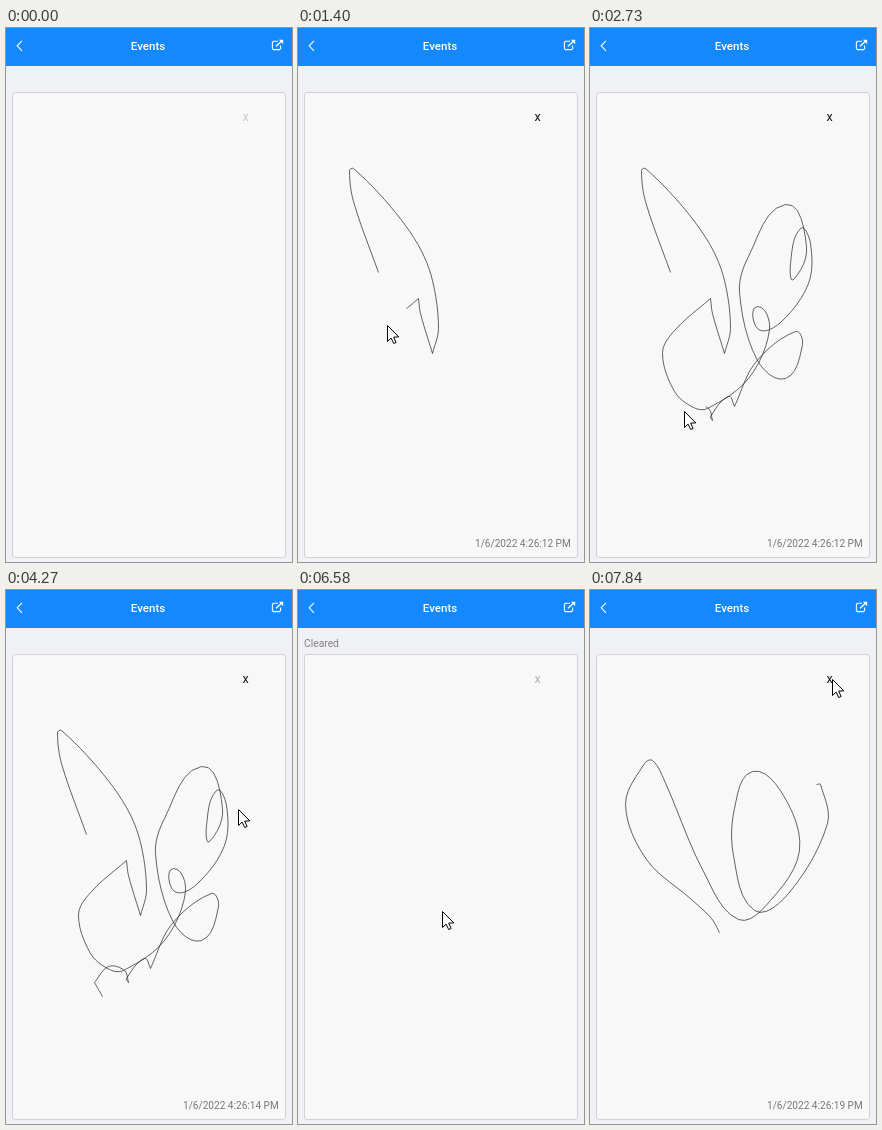
These frames come from a looping animation (286 px wide and 534 px high, 8000 ms). An HTML page with a canvas:

```html
<!DOCTYPE html>
<html lang="en">
<head>
<meta charset="utf-8">
<title>Signature pad</title>
<style>
  html, body { margin: 0; width: 100%; height: 100%; overflow: hidden; background: #f0f1f5; }
  canvas { display: block; width: 286px; height: 534px; }
</style>
</head>
<body>
<canvas id="stage" width="286" height="534"></canvas>
<script>
const ctx = document.getElementById('stage').getContext('2d');
const LOOP = 8000, STEP = 70, LAST = 7840;
const CLEAR = 6160;
const INK_LAG = 25; // px the ink trails behind the pointer

const mix = (a, b, k) => a.map((v, i) => v + (b[i] - v) * k);
const dist = (a, b) => Math.hypot(b[0] - a[0], b[1] - a[1]);

// Smooth polyline through key points; handles are a third of each span
function curve(pts) {
  const heading = i => {
    const a = pts[Math.max(i - 1, 0)], b = pts[Math.min(i + 1, pts.length - 1)], d = dist(a, b);
    return [(b[0] - a[0]) / d, (b[1] - a[1]) / d];
  };
  const out = [pts[0]];
  for (let i = 1; i < pts.length; i++) {
    const a = pts[i - 1], b = pts[i], h = dist(a, b) / 3;
    const u = heading(i - 1), v = heading(i);
    for (let k = 1 / 6; k < 1.01; k += 1 / 6) {
      const q = 1 - k;
      out.push([0, 1].map(j =>
        q * q * q * a[j] + 3 * q * q * k * (a[j] + u[j] * h) +
        3 * q * k * k * (b[j] - v[j] * h) + k * k * k * b[j]));
    }
  }
  return out;
}

// A pen stroke: arcs meet at sharp corners, the pen moves at constant speed (px/ms)
function makeStroke(start, speed, arcs) {
  const pts = arcs.flatMap(curve);
  let length = 0;
  for (let i = 1; i < pts.length; i++) length += dist(pts[i - 1], pts[i]);
  return { start, speed, pts, length, end: start + length / speed };
}

// The part of a polyline within the first `length` px
function trim(pts, length) {
  const out = [pts[0]];
  for (let i = 1; i < pts.length; i++) {
    const d = dist(pts[i - 1], pts[i]);
    if (d > length) return [...out, mix(pts[i - 1], pts[i], length / d)];
    out.push(pts[i]);
    length -= d;
  }
  return out;
}

const first = makeStroke(840, 0.755, [
  [[80,244],[55,173],[51,142],[55,140],[92,178],[120,217],[134,252],[140,300],[134,325]],
  [[134,325],[122,285],[120,270]],
  [[120,270],[85,301],[72,324],[84,363],[103,379],[117,380],[158,350],[179,301],[167,278],[168,301],
   [190,294],[218,255],[220,215],[210,200],[200,235],[203,251],[216,218],[195,176],[158,228],
   [149,264],[167,332],[195,350],[212,316],[205,303],[165,334],[144,378]],
  [[144,378],[138,368],[120,388],[122,392]],
  [[122,392],[118,380],[102,376],[88,392]],
  [[88,392],[96,406]]
]);
const second = makeStroke(6650, 0.95, [
  [[129,342],[121,328],[101,309],[56,269],[35,214],[54,173],[62,170],[73,188],[113,281],[148,329],
   [180,310],[209,260],[193,205],[162,181],[144,218],[143,265],[164,320],[198,303],[237,233],
   [230,194],[226,194]]
]);

// Pointer stops between strokes: [time, x, y]
const stops = [
  [420,150,66],[840,81,245],
  [2800,96,406],[2870,113,407],[3150,229,238],[4200,229,238],[4410,237,181],[4550,237,181],
  [4830,189,515],[4970,273,500],[5180,240,116],[5320,235,63],[5460,234,92],[5600,238,92],
  [6370,238,91],[6580,144,321],[6650,129,342],
  [7630,226,194],[7840,242,89]
];

function pointer(t) {
  const s = [first, second].find(s => t > s.start && t < s.end);
  if (s) return trim(s.pts, (t - s.start) * s.speed).pop();
  const i = stops.findIndex(p => p[0] >= t), b = stops[i], a = stops[i - 1] || b;
  return mix(a, b, (t - a[0]) / (b[0] - a[0] || 1)).slice(1);
}

function text(str, x, y, font, color, align) {
  ctx.font = font + ' Roboto, sans-serif';
  ctx.fillStyle = color;
  ctx.textAlign = align;
  ctx.fillText(str, x, y);
}

function trace(pts, close) {
  ctx.beginPath();
  pts.forEach(p => ctx.lineTo(p[0], p[1]));
  if (close) ctx.closePath();
}

function line(pts, color, width) {
  trace(pts);
  ctx.strokeStyle = color;
  ctx.lineWidth = width;
  ctx.stroke();
}

function drawPage() {
  ctx.fillStyle = '#f0f1f5';
  ctx.fillRect(0, 0, 286, 534);
  ctx.fillStyle = '#1488ff';
  ctx.fillRect(0, 0, 286, 38);
  text('Events', 142, 22, '500 11.5px', '#fff', 'center');

  line([[16, 12.8], [11.2, 17.8], [16, 22.8]], '#fff', 1.1);
  line([[272, 13.3], [267.5, 13.3], [266.4, 14.3], [266.4, 20.6], [267.4, 21.6],
        [273.6, 21.6], [274.6, 20.6], [274.6, 17.5]], '#fff', 1.1);
  line([[270, 18.3], [276, 12.8]], '#fff', 1.4);
  trace([[272.8, 11.8], [277.2, 11.8], [277.2, 16.2]], true);
  ctx.fillStyle = '#fff';
  ctx.fill();

  ctx.beginPath();
  ctx.roundRect(6.5, 64.5, 273, 465, 2.5);
  ctx.fillStyle = '#f8f8f8';
  ctx.fill();
  ctx.strokeStyle = '#d2d2d4';
  ctx.lineWidth = 1;
  ctx.stroke();
}

function drawInk(s, t) {
  const length = t >= s.end ? s.length : (t - s.start) * s.speed - INK_LAG;
  if (length <= 0) return;
  ctx.save();
  ctx.translate(0.5, 0.5);
  line(trim(s.pts, length), '#222', 0.7);
  ctx.restore();
}

function drawLabels(t, stroke) {
  const inked = t > stroke.start;
  const cleared = t >= CLEAR && !inked;
  text('x', 239.5, 93, '12.5px', inked ? '#111' : cleared ? '#b0b0b2' : '#c6c8d0', 'center');
  if (cleared) text('Cleared', 6, 57, '10.3px', '#808084', 'left');
  if (inked) {
    const sec = stroke === second ? 19 : t < first.end ? 12 : 14;
    text('1/6/2022 4:26:' + sec + ' PM', 272.8, 519, '10.1px', '#77777a', 'right');
  }
}

function drawPointer(t) {
  const [x, y] = pointer(t).map(Math.round);
  ctx.save();
  ctx.translate(x + 0.5, y + 0.5);
  trace([[0, 0], [0, 16], [3.6, 12.6], [6.2, 18], [8.6, 17], [6.2, 11.6], [11.3, 11.4]], true);
  ctx.fillStyle = '#fff';
  ctx.fill();
  ctx.strokeStyle = '#000';
  ctx.lineWidth = 1;
  ctx.stroke();
  ctx.restore();
}

function frame(now) {
  const t = Math.min(LAST, Math.floor((now % LOOP) / STEP) * STEP);
  const stroke = t < CLEAR ? first : second;
  drawPage();
  drawLabels(t, stroke);
  drawInk(stroke, t);
  if (t >= stops[0][0]) drawPointer(t);
}

const begin = performance.now();
function tick() {
  frame(performance.now() - begin);
  requestAnimationFrame(tick);
}
tick();
</script>
</body>
</html>
```
